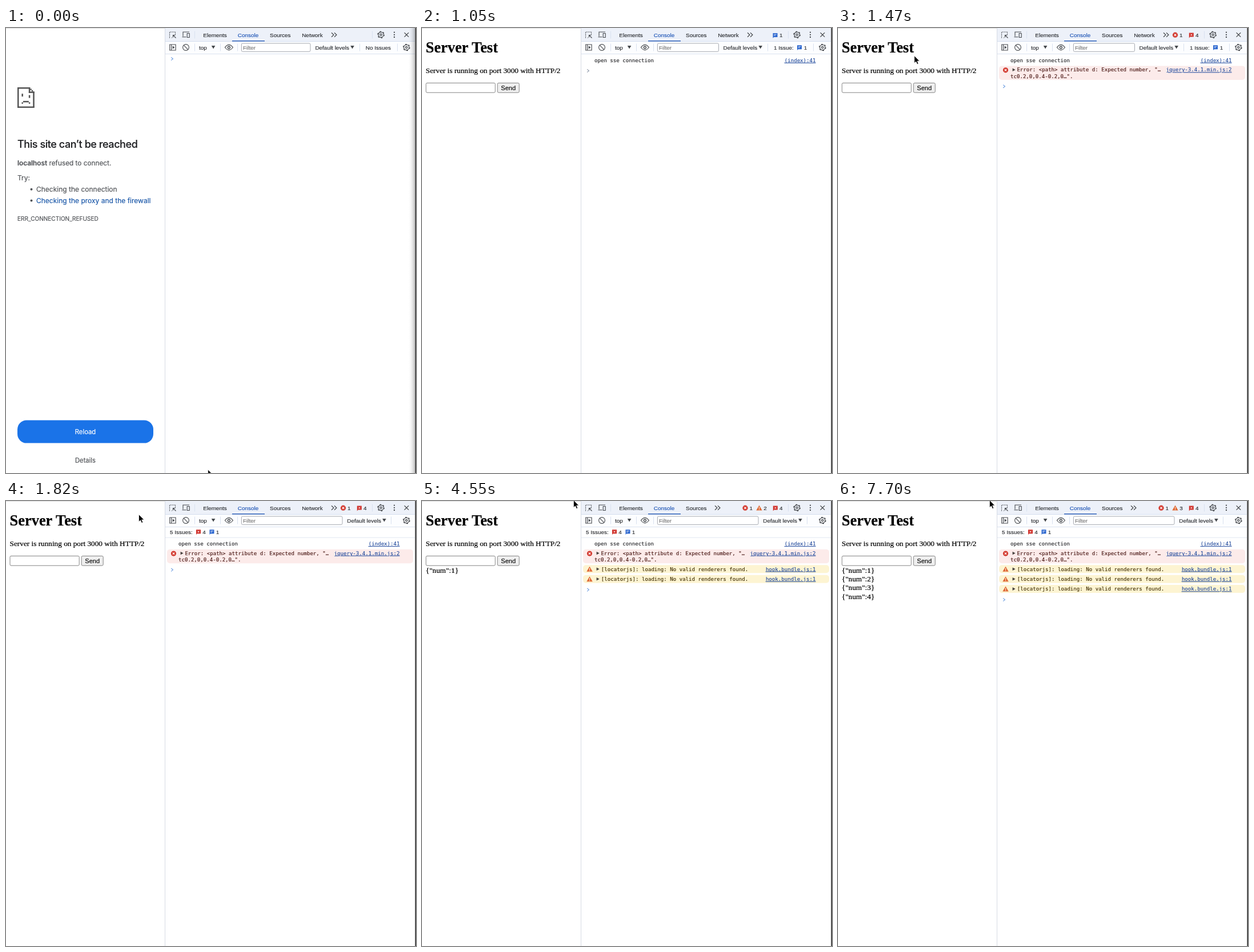
These frames come from a looping animation (718x780 px, 8 s). An HTML page:

```html
<!DOCTYPE html>
<html lang="en">
<head>
<meta charset="utf-8">
<title>Server Test</title>
<style>
html, body { margin: 0; width: 100%; height: 100%; overflow: hidden; background: #fff; }
svg { display: block; position: absolute; left: 0; top: 0; }
text { white-space: pre; font-optical-sizing: none; fill: currentColor; stroke: currentColor; stroke-width: .12; }
.ui { font: 9.95px "Liberation Sans", Arial, sans-serif; color: #26282c; }
.mono { font: 9.1px "DejaVu Sans Mono", Menlo, monospace; color: #202124; }
.link { color: #1f489b; text-decoration: underline; }
.err { color: #45120f; }
.warn { color: #3d2c00; }
.page { font: 12px Inter, sans-serif; color: #505357; stroke-width: .18; }
.serif { font: 13.25px "Liberation Serif", Times, serif; color: #000; stroke-width: .22; }
</style>
</head>
<body>
<svg width="718" height="780" viewBox="0 0 718 780">
  <defs>
    <linearGradient id="shade">
      <stop offset="0" stop-color="#fff" stop-opacity="0"/>
      <stop offset="1" stop-color="#000" stop-opacity=".24"/>
    </linearGradient>
  </defs>
  <rect width="718" height="780" fill="#fff"/>
  <g id="scene"></g>
  <path id="cursor" d="M0 0V13L3 10.3L5.1 15L7.3 14L5.3 9.4H9.3Z" fill="#000" stroke="#fff" stroke-width=".8"/>
</svg>
<script>
const LOOP = 8000, STEP = 70;
const scene = document.getElementById('scene');
const cursor = document.getElementById('cursor');

const esc = s => s.replace(/&/g, '&amp;').replace(/</g, '&lt;');
const text = (x, y, s, cls, extra = '') => `<text x="${x}" y="${y}" class="${cls}" ${extra}>${esc(s)}</text>`;
const rect = (x, y, w, h, fill, extra = '') => `<rect x="${x}" y="${y}" width="${w}" height="${h}" fill="${fill}" ${extra}/>`;
const path = (d, stroke = '#44474b', w = 1.1, extra = '') =>
  `<path d="${d}" fill="none" stroke="${stroke}" stroke-width="${w}" ${extra}/>`;
const shape = (d, fill) => `<path d="${d}" fill="${fill}"/>`;
const ring = (x, y, r, w = 1.1, extra = '') =>
  `<circle cx="${x}" cy="${y}" r="${r}" fill="none" stroke="#44474b" stroke-width="${w}" ${extra}/>`;
const sep = (x, y) => rect(x, y, 1, 13, '#d9e1ef');

const gear = (x, y) => ring(x, y, 4.6, 1.2) + ring(x, y, 5.7, 1.3, 'stroke-dasharray="2.6 3.37"') + ring(x, y, 1.7, 1.2);
const errorIcon = (x, y) => `<circle cx="${x}" cy="${y}" r="4.6" fill="#d33a30"/>` +
  path(`M${x - 1.8} ${y - 1.8}l3.6 3.6m0-3.6l-3.6 3.6`, '#fff');
const warnIcon = (x, y) => shape(`M${x} ${y - 4.8}L${x + 5.2} ${y + 4.2}H${x - 5.2}Z`, '#e06a36') +
  path(`M${x} ${y - 1.8}v3m0 .8v1.2`, '#fff', 1);
const bubble = (x, y, fill) => shape(`M${x - 4} ${y - 4}h8v7h-6.3l-1.7 1.8z`, fill);
const redBubble = (x, y) => bubble(x, y, '#d0312b') + path(`M${x - 1.5} ${y - 2}l3 3m0-3l-3 3`, '#fff', .9);
const blueBubble = (x, y) => bubble(x, y, '#2b66cf') + path(`M${x - 2.3} ${y - 1.8}h4.6m-4.6 2h3`, '#fff', .8);

function sadPage() {
  const u = 2.48;
  const bits = [[0, 0, 1, 14.5], [0, 0, 9, 1], [0, 13.5, 12, 1], [11, 3, 1, 11], [8, 0, 1, 4], [8, 3, 4, 1],
    [9, 1, 1, 1], [10, 2, 1, 1], [3, 4.5, 1, 2], [8, 5.5, 1, 2],
    [4, 9.6, 4, 1], [3, 10.6, 1, 1], [8, 10.6, 1, 1]];
  return bits.map(([x, y, w, h]) => rect(20 + x * u, 104 + y * u, w * u, h * u, '#535353')).join('');
}

function offlinePage() {
  const dot = y => `<circle cx="44.5" cy="${y}" r="2" fill="#505357"/>`;
  return sadPage() +
    text(20, 209.6, 'This site can’t be reached', 'page', 'style="font-size:18px;font-weight:500;letter-spacing:-.43px;color:#202124"') +
    `<text x="20" y="241" class="page" style="font-size:11.8px"><tspan font-weight="600">localhost</tspan> refused to connect.</text>` +
    text(20, 266.8, 'Try:', 'page') +
    dot(282.8) + text(53, 286.6, 'Checking the connection', 'page') +
    dot(302.6) + text(53, 306.5, 'Checking the proxy and the firewall', 'page', 'style="color:#1a57a8"') +
    text(20, 338.4, 'ERR_CONNECTION_REFUSED', 'page', 'style="font-size:10.05px"') +
    rect(20, 687.6, 238, 40, '#1a73e8', 'rx="16"') +
    text(139, 712, 'Reload', 'page', 'text-anchor="middle" style="font-size:11.3px;color:#fff"') +
    text(139, 762, 'Details', 'page', 'text-anchor="middle" style="font-size:11.2px"');
}

function serverPage(nums) {
  const box = 'stroke="#767676" stroke-width=".9" rx="2"';
  let out = text(6.6, 42.6, 'Server Test', 'serif', 'style="font-size:26.4px;font-weight:700"') +
    text(6.6, 79.4, 'Server is running on port 3000 with HTTP/2', 'serif') +
    rect(7, 96.4, 121.2, 16.8, '#fff', box) +
    rect(132.2, 96.4, 38, 16.8, '#efefef', box) +
    text(151.2, 108.6, 'Send', 'ui', 'text-anchor="middle" style="font-size:11px;color:#000"');
  for (let i = 1; i <= nums; i++) out += text(6.6, 110.5 + i * 15.3, `{"num":${i}}`, 'serif');
  return out;
}

function tabBar(s) {
  const more = s.warns ? 517 : 574;
  let out = rect(279, 0, 437, 23, '#edf1f9') + rect(279, 23, 437, 1, '#d5dfef') +
    path('M291 17h-1m-3 0h-.5v-10h10v4.5', '#44474b', 1.1, 'stroke-dasharray="1.7 1.2"') +
    path('M297.5 17.5l-5-5m0 4v-4h4') +
    path('M310 14.5v-7.5h11M308.5 15.8h7M317.2 9.5h4v7h-4z') + sep(330, 5.5) +
    text(345.3, 15.6, 'Elements', 'ui') + text(405.8, 15.6, 'Console', 'ui', 'style="color:#1850b4"') +
    rect(396, 22, 57, 1.4, '#2458b4') + text(462, 15.6, 'Sources', 'ui');
  if (!s.warns) out += text(518.2, 15.6, 'Network', 'ui');
  out += path(`M${more - 4} 8.2l4 3.8l-4 3.8m5-7.6l4 3.8l-4 3.8`, '#44474b', 1.2) + sep(641, 5.5);
  if (s.loaded && !s.error) out += blueBubble(618.5, 13) + text(626, 16.2, '1', 'ui');
  if (s.error) {
    const x = s.warns ? 566 : 590.5;
    out += errorIcon(x, 12.2) + text(x + 7.5, 16, '1', 'ui') + redBubble(618.8, 12.6) + text(626, 16, '4', 'ui');
    if (s.warns) out += warnIcon(590.5, 12.4) + text(598.3, 16, String(s.warns), 'ui');
  }
  return out + gear(656.6, 11.8) +
    [7.6, 11.8, 16].map(y => `<circle cx="680" cy="${y}" r="1.15" fill="#3c3f43"/>`).join('') +
    path('M697.6 8.1l7.6 7.6m0-7.6l-7.6 7.6', '#3c3f43', 1.2);
}

function toolbar(s) {
  const filterEnd = s.bar ? 589 : s.loaded ? 519.5 : 533;
  const levels = s.bar ? 597.3 : s.loaded ? 527.6 : 541.4;
  const down = x => shape(`M${x} 31h6.6l-3.3 5.6z`, '#44474b');
  let out = rect(279, 24, 437, 21, '#fcfdff') + rect(279, 45, 437, 1, '#dbe3f0') +
    path('M286.7 29h10.4v10h-10.4zM289.5 29v10') + shape('M291.6 31.2l3.8 2.8l-3.8 2.8z', '#44474b') +
    ring(315, 34, 5.4) + path('M311.2 30.2l7.6 7.6') + sep(330, 27.5) +
    text(338, 37.7, 'top', 'ui') + down(359.8) + sep(375, 27.5) +
    path('M383.4 34q7-9.2 14 0q-7 9.2-14 0z') + ring(390.4, 34, 2, 1.3) + sep(405, 27.5) +
    rect(412.4, 26.9, filterEnd - 412.4, 14.4, '#fff', 'rx="2" stroke="#9da1a8" stroke-width=".9"') +
    text(415, 37.7, 'Filter', 'ui', 'style="color:#757575"') +
    text(levels, 37.7, 'Default levels', 'ui') + down(levels + 61.8);
  if (s.bar) {
    out += rect(279, 63.6, 437, 1, '#e0e6f0') + text(287, 57.6, '5 Issues:', 'ui') +
      redBubble(337, 54.3) + text(344.3, 57.6, '4', 'ui') +
      blueBubble(360.5, 54.3) + text(367.7, 57.6, '1', 'ui') + sep(674, 27.5);
  } else if (s.loaded) {
    out += sep(605, 27.5) + text(616, 37.7, '1 Issue:', 'ui') + blueBubble(661, 34.3) + text(668.7, 37.7, '1', 'ui') + sep(685, 27.5);
  } else {
    out += sep(619, 27.5) + text(629.8, 37.7, 'No Issues', 'ui') + sep(685, 27.5);
  }
  return out + gear(701.3, 34);
}

function log(s) {
  const right = 'text-anchor="end"';
  const arrow = y => shape(`M305.6 ${y - 2.8}l5 2.8l-5 2.8z`, '#46403d');
  const top = s.bar ? 18.3 : 0;
  let out = '', prompt = 54;
  if (s.loaded) {
    out += text(302, 59.8 + top, 'open sse connection', 'mono') + text(689.5, 59.8 + top, '(index):41', 'mono link', right);
    prompt = 75;
  }
  if (s.error) {
    out += rect(282, 66.4 + top, 431, 24.6, '#fcebea', 'rx="5"') + errorIcon(293.5, 73.8 + top) + arrow(73.2 + top) +
      text(313.4, 76.4 + top, 'Error: <path> attribute d: Expected number, "…', 'mono err') +
      text(302, 87.8 + top, 'tc0.2,0,0.4-0.2,0…".', 'mono err') +
      text(689.5, 76.4 + top, 'jquery-3.4.1.min.js:2', 'mono link', right);
    prompt = 102.3 + top;
  }
  for (let i = 0; i < s.warns; i++) {
    const y = 119.3 + i * 17.4;
    out += rect(282, y - 7, 431, 14, '#fdf4d2', 'rx="5"') + warnIcon(293.5, y + .3) + arrow(y) +
      text(313.8, y + 3.2, '[locatorjs]: loading: No valid renderers found.', 'mono warn') +
      text(689.5, y + 3.2, 'hook.bundle.js:1', 'mono link', right);
    prompt = y + 18.9;
  }
  const tone = s.loaded && !s.error ? '#8d97a8' : '#6a9be0';
  return out + path(`M289.2 ${prompt - 2.7}l3.2 2.7l-3.2 2.7`, tone, 1.1);
}

const frame = s => (s.loaded ? serverPage(s.nums) : offlinePage()) +
  rect(0, 0, 718, 1, '#dcdcdc') + rect(278, 0, 1, 780, '#d6dbe4') +
  tabBar(s) + toolbar(s) + log(s) +
  (s.shadow ? rect(704, 0, 12, 780, 'url(#shade)') : '') +
  rect(716, 0, 1, 780, '#8c8c8c') + rect(717, 0, 1, 780, '#2b2b2b');

const count = (t, times) => times.filter(x => t >= x).length;
const stateAt = t => ({
  shadow: t < 840,
  loaded: t >= 1050,
  error: t >= 1190,
  bar: t >= 1540,
  warns: count(t, [2450, 3500, 6650]),
  nums: count(t, [4480, 5530, 6580, 7630])
});

// time, x, y of the pointer tip; y = -40 is off the stage
const track = [[0, 353.6, 774], [70, 300, 470], [140, 240, 162], [210, 240, 162], [280, 212, 77],
  [350, 204, -40], [1330, 104, -40], [1400, 106, 8], [1470, 133.6, 48.6], [1680, 205, 38],
  [1960, 260, 9], [2100, 260, 9], [2310, 265.4, -1.5], [LOOP, 265.4, -1.5]];

function tipAt(t) {
  const i = track.findIndex(p => p[0] > t);
  const [a, b] = [track[i - 1], track[i]];
  const k = (t - a[0]) / (b[0] - a[0]);
  return [a[1] + (b[1] - a[1]) * k, a[2] + (b[2] - a[2]) * k];
}

let shown = '';
function draw() {
  const t = performance.now() % LOOP;
  const s = stateAt(t), key = JSON.stringify(s);
  if (key !== shown) {
    scene.innerHTML = frame(s);
    shown = key;
  }
  const [x, y] = tipAt(Math.floor(t / STEP) * STEP);
  cursor.setAttribute('transform', `translate(${x} ${y})`);
  requestAnimationFrame(draw);
}
draw();
</script>
</body>
</html>
```
